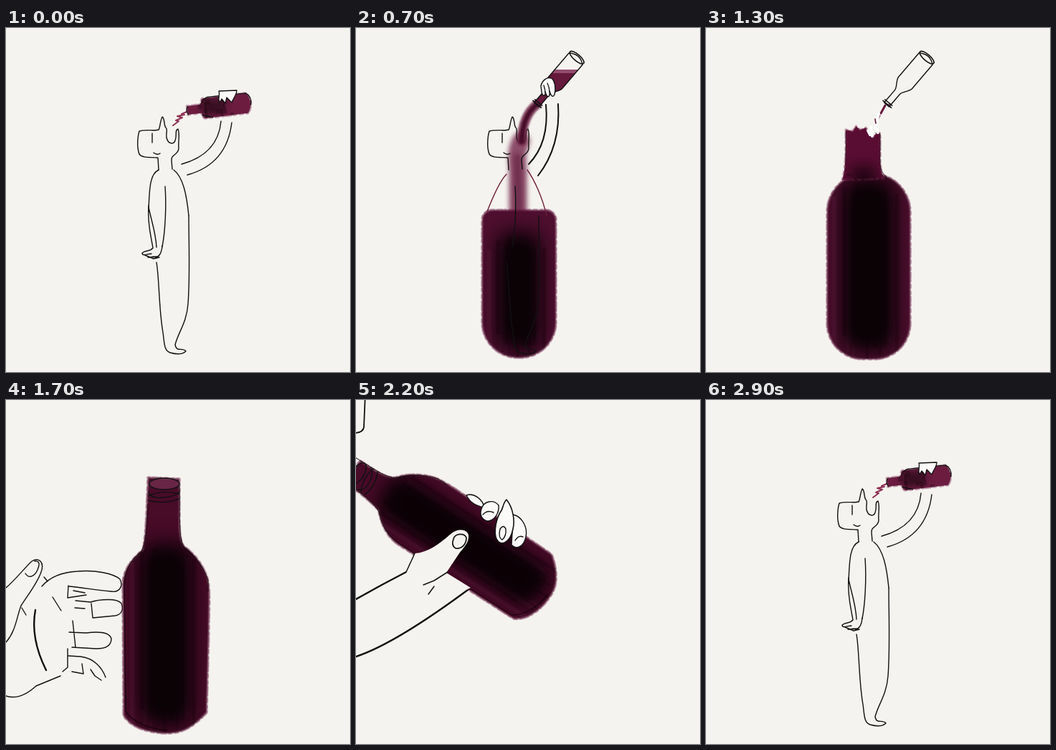
Write an HTML page with a canvas that moves like this. It is 480x480 px and loops after 3000 ms.

```html
<!DOCTYPE html>
<html lang="en">
<head>
<meta charset="utf-8">
<title>Wine loop</title>
<style>
  html, body { margin: 0; width: 100%; height: 100%; overflow: hidden; background: #f5f3ef; }
  canvas { display: block; width: 100%; height: 100%; }
</style>
</head>
<body>
<canvas id="stage" width="480" height="480"></canvas>
<script>
const ctx = document.getElementById('stage').getContext('2d');
const PAPER = '#f5f3ef', INK = '#111', WHITE = '#fbfaf8';
const STEP = 100, STEPS = 30;

const clamp = v => Math.max(0, Math.min(1, v));
const lerp = (a, b, k) => a + (b - a) * k;
const rand = n => { const v = Math.sin(n * 91.7) * 43758.5; return v - Math.floor(v); };

// Piecewise linear keys: [step, ...values]
function mix(keys, s) {
  let i = 0;
  while (i < keys.length - 2 && s > keys[i + 1][0]) i++;
  const a = keys[i], b = keys[i + 1];
  const k = clamp((s - a[0]) / (b[0] - a[0]));
  return a.slice(1).map((v, j) => lerp(v, b[j + 1], k));
}

function ink(d, w = 1.4, color = INK) {
  ctx.strokeStyle = color;
  ctx.lineWidth = w;
  ctx.stroke(d instanceof Path2D ? d : new Path2D(d));
}

function shape(d, fill = WHITE, w = 1.4) {
  const p = new Path2D(d);
  ctx.fillStyle = fill;
  ctx.fill(p);
  if (w) ink(p, w);
}

function withMatrix(m, draw) {
  ctx.save();
  ctx.transform(m.a, m.b, m.c, m.d, m.e, m.f);
  draw();
  ctx.restore();
}

// Watercolour fill: ragged rim, vertical streaks, soft dark core [x, y, w, h]
function wash(p, core, dark = 1, soft = 1, base = '#500f30') {
  ctx.save();
  ctx.filter = `blur(${1.3 * soft}px)`;
  ctx.fillStyle = base;
  ctx.fill(p);
  ctx.filter = 'none';
  ctx.setLineDash([3, 4, 7, 3, 2, 5, 4, 6]);
  ink(p, 3.5, 'rgba(115,38,78,.4)');
  ctx.setLineDash([]);
  ctx.clip(p);
  const [x, y, w, h] = core;
  for (let i = 0; i < 16; i++) {
    const sx = x - 18 + rand(i + 1) * (w + 36);
    ctx.fillStyle = i % 3 ? 'rgba(30,2,16,.3)' : 'rgba(120,45,85,.2)';
    ctx.fillRect(sx, y + rand(i + 40) * 30, 3 + rand(i + 70) * 6, h - rand(i + 9) * 40);
  }
  ctx.globalAlpha *= dark;
  ctx.fillStyle = '#0b0206';
  const blob = (inset, blur) => {
    ctx.filter = `blur(${blur * soft}px)`;
    ctx.beginPath();
    ctx.roundRect(x + inset, y + inset, Math.max(2, w - 2 * inset), Math.max(2, h - 2 * inset), w * .3);
    ctx.fill();
  };
  blob(-4, 15);
  blob(10, 9);
  ctx.restore();
}

// Large bottle: x, y, angle, scale x, scale y, neck top, half neck
const BOTTLE = [
  [15, 222, 287, 0, 1, 1, 126, 22],
  [17, 222, 287, 0, 1, 1, 108, 22],
  [18, 222, 287, 0, 1, 1, 108, 22],
  [22, 114.7, 174.7, -57, .9, 1.04, 150, 20],
  [25, 193, 144, -81, .65, .62, 108, 17],
  [29, 298, 110, -97, .24, .25, 108, 22]
];
const bottleMatrix = s => {
  const [x, y, r, sx, sy] = mix(BOTTLE, s);
  return new DOMMatrix().translate(x, y).rotate(r).scale(sx, sy);
};
const bottleMove = (s, ref) => bottleMatrix(s).multiply(bottleMatrix(ref).inverse());

function bottle(s) {
  const [, , , size, , top, n] = mix(BOTTLE, s);
  const l = 220 - n, r = 220 + n;
  withMatrix(bottleMatrix(s), () => {
    ctx.translate(-222, -287);
    const p = new Path2D(`M${l} ${top} L${r} ${top + 2} L${r} 165 C${r} 185 ${r + 1} 196 248 204
      C262 214 272 226 279 243 C286 258 283 290 283 320 L280 436 C262 456 245 466 222 465
      C195 464 172 455 164 440 L163 255 C164 238 174 223 191 209 C${l - 3} 190 ${l - 2} 165 ${l} ${top}Z`);
    wash(p, [190, 204, 66, 246], lerp(.35, 1, clamp(size * 2 - .9)), Math.max(.25, size), '#480b28');
    ink(`M${l} 145 C${l - 1} 180 ${l - 3} 200 189 211 C171 226 166 240 165 258 L167 435 C178 450 200 459 225 461
      M${r} 120 C${r} 180 ${r} 196 249 206 C265 218 275 232 282 252 v15`, 1.3, 'rgba(10,0,5,.7)');
    ctx.fillStyle = `rgba(135,65,100,${.5 * clamp((21 - s) / 3)})`;
    ctx.beginPath();
    ctx.ellipse(220, top + 9, n - 1, 8, 0, 0, 7);
    ctx.fill();
    ink(`M${l + 2} ${top + 9} a${n - 1} 8 0 1 0 ${2 * n - 2} 0 a${n - 1} 8 0 1 0 ${2 - 2 * n} 0
      M${l + 1} ${top + 20} q2 10 ${n} 8 q${n - 4} -2 ${n - 1} -9
      M${l} ${top + 32} q${n} 6 ${2 * n} -2 M${l} ${top + 26} q${n - 2} -9 ${2 * n} -3`, 1.4);
  });
}

// Arm as two curves: start, control, end of each, then line width
const ARMS = [
  [0, 245, 190, 296, 176, 300, 130, 253, 205, 308, 190, 315, 132, 1.4],
  [6, 241, 190, 270, 160, 265, 107, 254, 206, 286, 165, 282, 106, 2],
  [18, 0, 262, 65, 272, 134, 285, 0, 400, 85, 392, 168, 369, 1.8],
  [22, 0, 278, 35, 258, 70, 240, 0, 358, 55, 340, 160, 262, 2.4],
  [25, 0, 312, 105, 278, 171, 198, 15, 365, 110, 338, 216, 188, 3],
  [29, 245, 190, 296, 176, 300, 130, 253, 205, 308, 190, 315, 132, 1.4]
];
function arm(s) {
  const keys = s < 18 ? ARMS.slice(0, 2) : ARMS.slice(2);
  const [a, b, c, d, e, f, g, h, i, j, k, l, w] = mix(keys, s);
  ink(`M${a} ${b} Q${c} ${d} ${e} ${f} M${g} ${h} Q${i} ${j} ${k} ${l}`, w);
}

// Figure
const HEAD = `M213 198 L212 181 C203 180 190 182 186 176 C182 166 184 150 186 144 C195 141 207 144 213 142
  C215 139 215 130 218 124 C222 126 220 136 223 139 C226 141 223 146 224 153 C226 162 234 163 236 157
  C239 150 235 142 240 141 C243 148 240 158 241 168 C240 178 230 176 231 185 L232 197
  M204 147 V160 M206 174 Q211 178 215 175`;
const LIMBS = `M199 248 C197 275 203 293 205 307 C200 313 195 309 190 314 C190 319 197 315 203 315
  M194 317 L206 322 L214 320 M198 320 L210 319 M199 250 C203 270 209 285 210 306
  M218 304 C217 315 213 322 205 319`;
const LEGS = `M255 262 C255 300 257 345 254 385 C252 412 240 425 236 442 C238 453 246 445 251 451
  C246 456 236 455 229 453 C220 450 221 438 219 425 C213 390 214 350 210 327`;

function torso(k) {
  const tint = k > .8 ? '#6d1f3c' : INK;
  ink(`M${213 - 3 * k} ${198 + 6 * k} C${202 + k} ${203 + 8 * k} ${200 - 6 * k} ${218 + 10 * k} ${199 - 16 * k} 256`, 1.4, tint);
  ink(`M${234 + 5 * k} 198 C${247 + 2 * k} ${208 + 4 * k} ${252 + 8 * k} ${232 + 4 * k} ${255 + 11 * k} 262`, 1.4, tint);
}

function figure(k = 0, full = true) {
  ink(HEAD);
  ink('M222 221 C224 250 222 285 218 305');
  torso(k);
  if (full) ink(LIMBS);
  ink(LEGS);
}

// Pouring bottle
const pourMatrix = s => {
  const k = clamp(s / 5);
  return new DOMMatrix().translate(lerp(253, 252, k), lerp(115, 107, k)).rotate(lerp(-7, -49.5, k));
};
const pourMove = (s, ref) => pourMatrix(s).multiply(pourMatrix(ref).inverse());

function pourBottle(s) {
  const k = clamp(s / 5), m = pourMatrix(s);
  const n = lerp(6, 4.5, k), b = lerp(14, 12.5, k), u = lerp(17, 23, k), v = lerp(24, 40, k);
  const p = new Path2D(`M0 ${-n} L${u} ${-n} C${u + 5} ${-n} ${v - 5} ${-b} ${v} ${-b} L84 ${-b}
    Q94 0 84 ${b} L${v} ${b} C${v - 5} ${b} ${u + 5} ${n} ${u} ${n} L0 ${n}Z`);
  if (s < 2) {
    withMatrix(m, () => {
      wash(p, [24, -8, 26, 14], .5, .3, '#6b1c3f');
      ink(`M22 -8 Q24 -14 30 -15 L84 -14 Q92 -8 89 3 M20 9 L34 14 M1 -5 Q-3 0 1 6`, 1.3);
    });
    return;
  }
  if (s < 14) {
    const level = 8 * s + 2;
    ctx.save();
    ctx.transform(m.a, m.b, m.c, m.d, m.e, m.f);
    ctx.clip(p);
    ctx.setTransform(1, 0, 0, 1, 0, 0);
    ctx.fillStyle = '#65193b';
    ctx.fillRect(230, level, 120, 110);
    ctx.fillStyle = 'rgba(165,100,130,.7)';
    ctx.fillRect(230, level, 120, 5);
    ctx.restore();
  }
  withMatrix(m, () => {
    ink(p, 1.4);
    ink(`M1 ${-n - 3} L1 ${n + 3} M4 ${-n - 2} L4 ${n + 2}`, 1.6);
    if (k > .6) ink(`M82 0 a4.5 ${b} 0 1 0 9 0 a4.5 ${b} 0 1 0 -9 0`, 1.6);
  });
}

function pourHand(s) {
  if (s < 4) {
    withMatrix(pourMove(s, 0), () =>
      shape('M297 88 L322 87 C322 93 317 98 315 104 L308 97 L306 105 L301 99 L298 104 C295 98 299 93 297 88Z', WHITE, 1.3));
  } else {
    withMatrix(pourMove(s, 7), () => {
      shape('M258 81 C260 72 268 67 274 71 C278 76 279 86 277 93 C274 98 272 94 270 88 C271 97 267 99 264 89 C265 95 260 97 259 89Z');
      ink('M262 80 Q264 86 264 90 M267 77 Q270 83 270 89', 1.3);
    });
  }
}

function drips() {
  ink('M252 117 L245 120 M249 121 L239 123 L246 125 L237 129 L241 130 L233 136', 2, '#8d3154');
}

function stream(s) {
  const w = mix([[2, 4], [6, 14], [9, 12], [12, 3]], s)[0];
  const m = pourMatrix(s);
  const d = `M${m.e} ${m.f} C238 118 232 135 231 ${mix([[2, 150], [4, 158]], s)[0]}`;
  ctx.save();
  ctx.filter = 'blur(.8px)';
  ink(d, w, 'rgba(112,38,72,.8)');
  ink(d, w * .5, '#470d29');
  ctx.restore();
}

function throat(s, level) {
  ctx.save();
  ctx.filter = 'blur(3px)';
  const w = mix([[2, 6], [7, 25]], s)[0];
  ink(`M230 158 C224 170 224 180 226 200 L226 ${level + 10}`, w, 'rgba(122,48,82,.85)');
  ink(`M225 180 L227 ${level + 10}`, w * .4, 'rgba(80,15,48,.5)');
  ctx.restore();
}

// Wine filling the body: left, right, top, bottom, upper and lower corner radius
const FILL = [
  [1, 220, 251, 440, 454, 4, 14],
  [6, 191, 268, 285, 459, 10, 40],
  [7, 176, 279, 254, 460, 14, 50],
  [13, 169, 285, 203, 462, 54, 50]
];
function fillBody(s) {
  const [l, r, t, b, rt, rb] = mix(FILL, s);
  const p = new Path2D();
  p.roundRect(l, t, r - l, b - t, [rt, rt, rb, rb]);
  const pad = Math.min(24, (r - l) * .24);
  const y = t + lerp(34, 10, clamp((s - 7) / 6));
  wash(p, [l + pad, y, r - l - 2 * pad, Math.max(4, b - 14 - y)], 1, clamp((r - l) / 105));
}

function fillNeck(s) {
  const [l, r, t] = mix([[8, 209, 239, 164], [13, 195, 243, 142], [14, 196, 243, 132]], s);
  const w = r - l;
  const p = new Path2D(`M${l} ${t} l${w * .2} 2 l${w * .1} -7 l${w * .12} 5 l${w * .16} -3 l${w * .12} 7
    l${w * .1} 6 l${w * .1} -6 L${r} ${t + 4} L${r} 185 Q243 198 248 210 L190 212 Q196 195 ${l} ${t}Z`);
  wash(p, [l + 10, 195, w - 18, 30], .6, .6, '#5a0d33');
  ink(`M${l} ${t + 3} L${l} 190 M${r} ${t + 5} L${r} 190 Q244 202 252 208`, 1, 'rgba(20,0,10,.7)');
}

// Open hand reaching in
function openHand(dx) {
  ctx.save();
  ctx.translate(dx, 0);
  ink(`M-60 310 L0 262 C12 252 28 232 36 225 C46 219 54 226 49 240 C44 255 32 270 21 287 C15 302 14 322 0 338
    M27 242 C32 250 40 246 44 237 C48 228 46 224 40 225
    M50 260 C62 246 80 240 100 239 C125 237 150 242 159 250 C165 262 156 269 146 267 C125 265 108 262 88 260
    M87 259 L86 276 L112 272 M94 266 L110 269 M58 253 L53 247
    M96 290 L110 291 M97 280 L118 282 C130 278 156 276 161 284 C165 293 160 300 152 301 L121 304 L119 284
    M88 324 L112 325 C128 323 144 323 147 333 C147 343 140 347 126 347 L92 345 M93 308 L97 345
    M87 357 L104 358 C122 360 134 373 139 387 M92 379 L108 382 L106 368 M118 376 L124 385 L133 391
    M-60 400 L0 413 C15 418 30 410 42 399 L76 385 M79 379 L86 373 L86 347 M65 275 L77 294 M22 290 L28 300`, 1.4);
  ink('M41 293 C35 325 45 355 56 377', 2.4);
  ctx.restore();
}

function gripHand(s) {
  withMatrix(bottleMove(s, 22), () => {
    shape(`M70 240 L82 214 C100 213 116 201 132 187 C142 178 156 180 157 189 C158 199 150 206 144 214
      L126 241 L160 262 L110 285Z`, PAPER, 0);
    ink('M70 240 L82 214 M94 258 L109 252 L128 240 M101 271 L109 260', 1.5);
    ink('M136 194 C138 186 151 185 154 192 C154 202 147 208 139 207 C134 204 134 199 136 194Z', 1.7);
    shape('M154 133 C165 129 177 139 179 150 C170 148 160 145 154 133Z');
    shape('M175 152 C178 141 192 138 199 147 C200 157 194 168 184 169 C176 168 172 160 175 152Z');
    shape('M219 160 C231 162 240 177 237 191 C234 206 223 209 217 202 L218 185Z');
    shape('M210 139 C219 150 222 168 219 180 C216 196 206 203 199 198 C191 191 194 170 201 157 C206 152 204 145 210 139Z', WHITE, 1.6);
    ink('M201 180 q5 -7 8 0 q1 10 -5 15 q-6 -3 -3 -15 M222 196 q5 -8 11 -5 M177 160 q6 -7 15 -3', 1.4);
  });
}

function fist(s) {
  withMatrix(bottleMove(s, 25), () => {
    shape('M169 200 L166 177 L180 180 C178 165 178 152 185 150 C194 149 191 165 196 186 L172 205Z', PAPER, 0);
    ink('M168 176 L167 193 L172 200 M180 157 C180 149 188 149 190 153', 1.6);
    shape(`M190 103 C187 118 190 128 192 137 C195 143 204 143 206 138 C208 147 211 152 217 151 C222 150 223 146 224 142
      C227 149 236 150 240 145 C241 140 239 138 240 133 C245 138 252 136 254 130 C253 121 244 114 232 108 C215 102 200 102 190 103Z`, WHITE, 1.6);
    ink('M201 105 C209 115 205 130 206 138 M215 105 C225 115 224 135 224 142 M228 107 C239 118 239 126 240 133 M196 140 q3 -7 8 -4 M245 125 l6 -3', 1.7);
  });
}

// Scenes
function drinking(s) {
  arm(s);
  if (s > 0) filling(s);
  else figure();
  if (s > 1) stream(s);
  else drips();
  pourBottle(s);
  pourHand(s);
}

function filling(s) {
  if (s > 1) throat(s, mix(FILL, s)[2]);
  fillBody(s);
  figure(clamp((s - 2) / 5), s < 6);
}

function turning(s) {
  if (s < 10) {
    arm(s);
    throat(s, mix(FILL, s)[2]);
    ink(HEAD);
    torso(1);
  }
  fillBody(s);
  fillNeck(s);
  if (s < 12) stream(s);
  else if (s < 14) {
    ink('M250 108 L244 119 M242 122 L238 130', 3, '#65193b');
    ink('M241 120 L237 135 M236 138 L240 146 M230 138 L232 151 M226 143 L229 149', 4, '#fff');
    ink('M236 127 l1 6', 1.6, '#65193b');
  }
  if (s > 13) ctx.globalAlpha = .5;
  pourBottle(s);
  ctx.globalAlpha = 1;
  if (s < 10) pourHand(s);
}

function tipping(s) {
  arm(s);
  bottle(s);
  if (s < 24) gripHand(s);
  else fist(s);
  if (s > 21 && s < 25) {
    const k = s - 22;
    ink(`M${13 - 4 * k} ${75 * k - 10} l-2 48 q-1 7 -12 8`, 1.8);
  }
  if (s === 25) ink('M0 268 V273 M0 345 C12 362 25 380 32 400 L42 470', 2.8);
}

function pullBack(s) {
  const [z, x, y] = mix([[25, 2.4, -10, 345], [29, 1, 237, 200]], s);
  withMatrix(new DOMMatrix().translate(x, y).scale(z).translate(-237, -200), () => figure());
  arm(s);
  bottle(s);
  fist(s);
}

function draw(s) {
  ctx.setTransform(1, 0, 0, 1, 0, 0);
  ctx.lineCap = ctx.lineJoin = 'round';
  ctx.fillStyle = PAPER;
  ctx.fillRect(0, 0, 480, 480);
  if (s === 29) drinking(0);
  else if (s < 8) drinking(s);
  else if (s < 15) turning(s);
  else if (s < 18) {
    openHand([-80, -35, 0][s - 15]);
    bottle(s);
  } else if (s < 26) tipping(s);
  else pullBack(s);
}

let last = -1;
function tick() {
  const s = Math.floor(performance.now() / STEP) % STEPS;
  if (s !== last) draw(last = s);
  requestAnimationFrame(tick);
}
tick();
</script>
</body>
</html>
```
